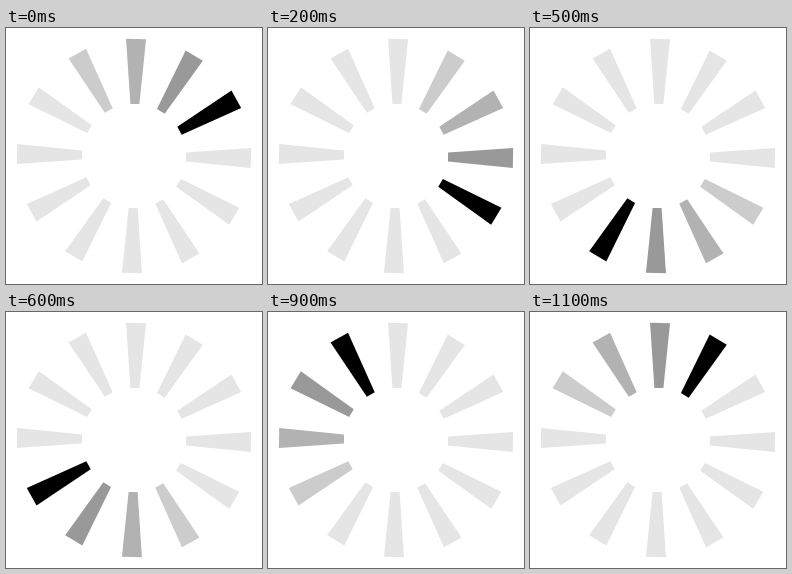
Recreate the animation shown at these times as an HTML page. Size 256x256 px, loop 1200 ms.

```html
<!DOCTYPE html>
<html lang="en">
<head>
<meta charset="utf-8">
<title>Loading spinner</title>
<style>
  html, body { margin: 0; width: 100%; height: 100%; overflow: hidden; background: #fff; }
  svg { display: block; width: 100vw; height: 100vh; }
  .spoke { fill: #e5e5e5; animation: fade 1200ms step-end infinite; }
  @keyframes fade {
    0% { fill: #000; }
    8.3333% { fill: #999; }
    16.6666% { fill: #b2b2b2; }
    25% { fill: #ccc; }
    33.3333%, 100% { fill: #e5e5e5; }
  }
</style>
</head>
<body>
<svg id="spinner" viewBox="0 0 256 256"></svg>
<script>
  const COUNT = 12, STEP = 100, TILT = 1, FIRST = 2;
  const spinner = document.getElementById('spinner');

  for (let i = 0; i < COUNT; i++) {
    const spoke = document.createElementNS('http://www.w3.org/2000/svg', 'polygon');
    spoke.setAttribute('class', 'spoke');
    spoke.setAttribute('points', '-10,-117 10,-117 4.5,-52 -4.5,-52');
    spoke.setAttribute('transform', `translate(128 128) rotate(${i * 360 / COUNT + TILT})`);
    // Each spoke turns black one step after its neighbour.
    spoke.style.animationDelay = `${(i - FIRST - COUNT) * STEP}ms`;
    spinner.append(spoke);
  }
</script>
</body>
</html>
```
